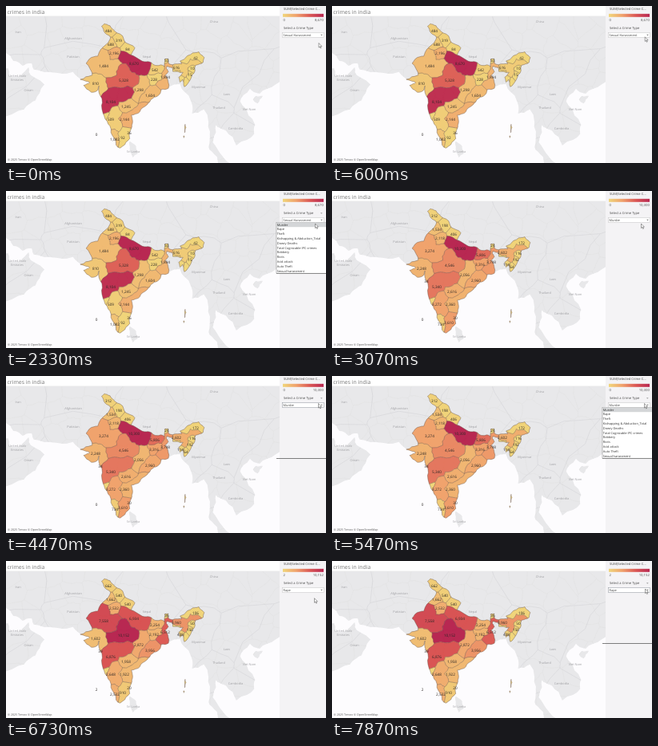
Animation of 400 by 197 pixels, one loop 8000 ms. Source, as an HTML page:

```html
<!DOCTYPE html>
<html lang="en">
<head>
<meta charset="utf-8">
<title>crimes in india</title>
<style>
html, body { margin: 0; width: 100%; height: 100%; overflow: hidden; background: #fff; }
svg { display: block; width: 400px; height: 197px; }
text { font-family: "Open Sans", "Noto Sans", sans-serif; text-rendering: geometricPrecision; }
</style>
</head>
<body>
<svg id="stage" viewBox="0 0 400 197"></svg>
<script>
const NS = 'http://www.w3.org/2000/svg';
const stage = document.getElementById('stage');
const LOOP = 8000;

function add(parent, tag, attrs, text) {
  const el = document.createElementNS(NS, tag);
  for (const k in attrs) el.setAttribute(k, attrs[k]);
  if (text !== undefined) el.textContent = text;
  parent.appendChild(el);
  return el;
}
const rect = (parent, x, y, width, height, fill, more) =>
  add(parent, 'rect', { x, y, width, height, fill, ...more });
const label = (parent, x, y, size, fill, text, more) =>
  add(parent, 'text', { x, y, 'font-size': size, fill, ...more }, text);
const show = (el, on) => el.setAttribute('visibility', on ? 'visible' : 'hidden');
const lerp = (a, b, k) => a.map((v, i) => v + (b[i] - v) * k);
const pairs = s => s.split(' ').map(p => p.split(',').map(Number));

// Mercator
function project([lon, lat]) {
  const m = Math.asinh(Math.tan(lat * Math.PI / 180)) * 180 / Math.PI;
  return [5.33 * lon - 270.7, 221.6 - 5.33 * m];
}

// Ragged line by midpoint displacement; the same edge bends alike from both ends
function bend(a, b, depth = 2) {
  if (!depth) return [b];
  const sx = a[0] + b[0], sy = a[1] + b[1];
  const d = 0.1 * Math.hypot(a[0] - b[0], a[1] - b[1]);
  const mid = [sx / 2 + d * Math.sin(sx * 1.7 + sy * 3.1), sy / 2 + d * Math.sin(sx * 2.9 + sy * 1.3)];
  return [...bend(a, mid, depth - 1), ...bend(mid, b, depth - 1)];
}
const line = pts => 'M' + pts.map(p => p[0].toFixed(2) + ' ' + p[1].toFixed(2)).join('L');
const ring = pts => line(pts.flatMap((p, i) => bend(p, pts[(i + 1) % pts.length]))) + 'Z';
const coast = s => ring(pairs(s).map(project));

// Part of a cell nearer to a than to b; each corner keeps the neighbour across its next edge
function trim(cell, a, b, neighbour) {
  const gap = p => (p[0] - b[0]) ** 2 + (p[1] - b[1]) ** 2 - (p[0] - a[0]) ** 2 - (p[1] - a[1]) ** 2;
  const out = [];
  cell.forEach((c, i) => {
    const q = cell[(i + 1) % cell.length].p, f = gap(c.p), g = gap(q);
    if (f >= 0) out.push(c);
    if (f >= 0 !== g >= 0) out.push({ p: lerp(c.p, q, f / (f - g)), next: f >= 0 ? neighbour : c.next });
  });
  return out;
}
// Nearest-seed regions: fill path per owner, and the lines between owners
function regions(seeds) {
  const fills = {};
  let lines = '';
  seeds.forEach((s, i) => {
    let cell = [[-60, -60], [460, -60], [460, 260], [-60, 260]].map(p => ({ p, next: -1 }));
    seeds.forEach((o, j) => { if (j !== i) cell = trim(cell, s.at, o.at, j); });
    fills[s.owner] = (fills[s.owner] || '') + ring(cell.map(c => c.p));
    cell.forEach((c, k) => {
      if (c.next > i && seeds[c.next].owner !== s.owner) {
        lines += line([c.p, ...bend(c.p, cell[(k + 1) % cell.length].p)]);
      }
    });
  });
  return { fills, lines };
}

const lands = [
  '48,40 48,30 50.5,29.5 52.5,27.5 54.7,26.5 56.8,27 57.3,25.7 61.5,25.1 66.5,25.2 68.2,23.7 73,24 79,22.5 89,21.9 91.6,22.6 94.3,18.5 94.4,16 97.2,17 98.6,12 98.3,8.3 100.3,6 101,2 103.5,2 103.4,4.5 101,6.9 99.3,9.4 100,13.4 101,12.7 102.5,12 104.8,8.7 109,11.4 109.2,13.5 107.2,16.9 105.7,18.8 108,21.6 110.3,20.5 114,22.5 118,24 118,40',
  '48,27.5 50.1,25.9 51.3,26 51.6,24.2 53.5,24.1 56.1,26.2 56.6,24.5 59.8,22.5 57.7,19 55,17 48,14',
  '79.8,9.7 81.3,8.5 81.7,6.8 80.5,5.9 79.8,8',
  '108.7,19.2 109.5,20 111,20 109.8,18.3'
].map(coast).join('');
const india = coast('73.2,34.5 73.9,35 75.2,34.6 76,33.8 76.8,33.2 77.7,32.9 78.8,31.3 81,30.2 80.1,28.8 82.5,27.6 84,27.4 85.8,26.6 88,26.4 88,27.9 88.8,28 88.9,27 89.9,26.7 92,26.9 91.6,27.5 94.6,29.2 96,29.4 97.3,28.2 97,27.2 95.2,26.6 94.6,24.7 94.2,23.9 93,22.2 92.6,22 92.2,23.6 91.6,23 91.3,24.1 92.3,25.1 89.9,25.3 89.8,26.1 88.5,26.4 88.4,25.9 88.9,25.3 88.1,24.5 88.8,23.2 88.9,21.7 87.2,21.4 86.4,20 84.7,19.1 83.3,17.6 82.2,16.5 80.2,15.7 80.3,13.4 79.8,11.8 79.8,10.3 78.9,9.4 77.5,8.1 76.6,8.8 75.4,11.7 74.5,14.3 73.3,17 72.8,20.2 72.6,22.2 72.2,21.2 70.8,20.8 69,22.3 70.4,22.9 68.2,23.6 71,24.5 70.2,26.4 69.6,27 70.4,28 72.3,28.5 74.4,31 75.3,32.3 74,33.2');
const islands = coast('92.8,13.6 93,12.9 92.7,11.7 92.7,13') + coast('92.4,10.9 92.6,10.9 92.5,10.5');

const countries = {
  Iran: '15,33', Afghanistan: '84,41', Pakistan: '84,64', China: '260,20', 'United Arab Emirates': '14,88',
  Oman: '28,106', Myanmar: '241,102', Thailand: '266,128', Laos: '276,111', 'Viet Nam': '304,130',
  Cambodia: '287,154', 'Sri Lanka': '159,183', Nepal: '176,64'
};

// Seeds of each state, the first also placing its number; then one value per crime type
const states = [
  ['128,31', '484 312 662'],
  ['141,43', '319 198 540'],
  ['131,48', '688 1,534 1,662'],
  ['135,59', '2,196 2,118 2,532'],
  ['152,54', '84 406 540'],
  ['160,72 148,64 171,78', '8,670 10,300 6,934'],
  ['122,75 122,62 108,72 137,74 130,82', '1,484 3,274 7,558'],
  ['112,97 119,97 118,104', '810 2,248 1,602'],
  ['147,93 146,81 133,95 159,95', '5,328 4,546 10,152'],
  ['131,120 124,114 123,127 134,111 147,112 154,109', '8,104 5,340 6,876'],
  ['123,139', '- - -'],
  ['131,142 137,135 139,149 133,149', '509 3,272 2,648'],
  ['136,167 132,159 139,174', '1,082 734 2,532'],
  ['146,165 150,157 145,174', '92 3,610 910'],
  ['148,142 152,148 157,139 165,132 173,126', '2,144 2,360 1,922'],
  ['150,126 157,123', '1,245 2,616 1,958'],
  ['166,105 164,114 172,96', '1,298 2,056 2,872'],
  ['180,112 172,117 184,107 188,106', '1,604 2,960 3,956'],
  ['185,92 191,89', '228 3,316 2,192'],
  ['186,80 193,79', '542 5,806 2,254'],
  ['199,89 194,97 200,83 203,75', '1,894 3,798 6,512'],
  ['201,68', '53 24 36'],
  ['213,77 222,76 231,73 237,71 223,84', '616 2,602 3,960'],
  ['212,83', '- - -'],
  ['237,65 224,68 243,64', '42 172 106'],
  ['233,78', '10 116 50'],
  ['230,86', '15 192 150'],
  ['225,95', '- 64 -'],
  ['218,92', '- 114 438']
].map(([seeds, values]) => ({ seeds: pairs(seeds), values: values.split(' ') }));
// Numbers of places too small for a shape
const spots = [['154,159', '36 30 20'], ['118,113', '- 34 39'], ['113,161', '0 0 2']]
  .map(([at, values]) => ({ seeds: pairs(at), values: values.split(' ') }));

const kinds = [
  { name: 'Sexual Harassment', low: '0', high: '8,670' },
  { name: 'Murder', low: '0', high: '10,300' },
  { name: 'Rape', low: '2', high: '10,152' }
];
const ramp = [[240, 214, 122], [240, 161, 108], [218, 86, 84], [184, 40, 82]];
function shade(f) {
  const n = ramp.length - 1, i = Math.min(n - 1, Math.floor(f * n));
  return 'rgb(' + lerp(ramp[i], ramp[i + 1], f * n - i).map(Math.round).join(',') + ')';
}
const number = s => Number(s.replace(',', '')) || 0;

const defs = add(stage, 'defs');
function clip(id, d) {
  add(add(defs, 'clipPath', { id }), 'path', { d });
  return { 'clip-path': `url(#${id})` };
}

// Base map: countries grow around their names, provinces around a jittered grid
const map = add(stage, 'g', { ...clip('frame', 'M0 13H342V197H0Z'), 'stroke-linejoin': 'round' });
rect(map, 0, 13, 342, 184, '#fdfcfe');
add(map, 'path', { d: lands, fill: '#e8e8ea' });
const soil = add(map, 'g', { ...clip('land', lands), fill: 'none', 'stroke-width': 0.5 });
let seed = 7;
const random = () => (seed = seed * 16807 % 2147483647) / 2147483647;
const grid = [];
for (let x = 0; x < 360; x += 24) {
  for (let y = 10; y < 210; y += 24) grid.push({ owner: grid.length, at: [x + random() * 20, y + random() * 20] });
}
add(soil, 'path', { d: regions(grid).lines, stroke: '#dededf' });
const nations = Object.entries(countries).map(([owner, at]) => ({ owner, at: pairs(at)[0] }));
add(soil, 'path', { d: regions(nations).lines, stroke: '#cfcfd2' });
for (const { owner, at } of nations) {
  const rows = owner.length > 12 ? ['United Arab', 'Emirates'] : [owner];
  rows.forEach((s, i) => label(map, at[0], at[1] + 1.3 + i * 4.4, 3.9, '#a0a0a4', s, { 'text-anchor': 'middle' }));
}

// States and their numbers
const cells = regions(states.flatMap((s, owner) => s.seeds.map(at => ({ owner, at }))));
const inside = add(map, 'g', clip('india', india));
const areas = states.map((s, i) => add(inside, 'path', { d: cells.fills[i], 'stroke-width': 0.3 }));
const ink = { fill: 'none', stroke: '#6b5648', 'stroke-width': 0.45 };
add(inside, 'path', { d: cells.lines, ...ink });
add(map, 'path', { d: india, ...ink });
add(map, 'path', { d: islands, ...ink, fill: shade(0) });
const marked = [...states, ...spots];
const marks = marked.map(({ seeds: [[x, y]] }) => label(map, x, y + 1.7, 4.7, '#2c2826', '', { 'text-anchor': 'middle' }));
label(map, 2, 193.6, 3.6, '#555', '© 2025 Tervox © OpenStreetMap');

// Title and side panel
rect(stage, 0, 0, 342, 13, '#fff');
rect(stage, 0, 12.6, 342, 0.4, '#e2e2e2');
label(stage, 1.6, 9.5, 6.9, '#777', 'crimes in india');
rect(stage, 342, 0, 58, 197, '#f4f3f5');
label(stage, 347, 5.4, 4.1, '#444', 'SUM(Selected Crime C...');
const grad = add(defs, 'linearGradient', { id: 'scale' });
ramp.forEach((c, i) => add(grad, 'stop', { offset: i / (ramp.length - 1), 'stop-color': `rgb(${c})` }));
rect(stage, 346, 9.8, 51, 4, 'url(#scale)');
const low = label(stage, 346.5, 18.6, 4.3, '#555', '');
const high = label(stage, 397, 18.6, 4.3, '#555', '', { 'text-anchor': 'end' });
label(stage, 347, 29.4, 4.1, '#444', 'Select a Crime Type');
const caret = add(stage, 'path', { d: 'M393 27.3h2.6l-1.3 1.5z', fill: '#999' });

// Drop-down box and its list
const ROW = 5.8;
const box = rect(stage, 345.5, 33.4, 52, 6, '#fff', { 'stroke-width': 0.5 });
const chosen = label(stage, 346.6, 0, 3.9, '#444', '');
add(stage, 'path', { d: 'M393.2 35.7h2.6l-1.3 1.6z', fill: '#777' });
const edge = rect(stage, 338, 103, 62, 0.7, '#4a4a4a');
const list = add(stage, 'g');
rect(list, 338, 39.4, 62.5, 11 * ROW, '#fff', { stroke: '#777', 'stroke-width': 0.5 });
const bar = rect(list, 338.3, 0, 62, ROW, '#d4d6d8');
['Murder', 'Rape', 'Theft', 'Kidnapping & Abduction_Total', 'Dowry Deaths', 'Total Cognizable IPC crimes', 'Robbery',
  'Riots', 'Acid attack', 'Auto Theft', 'Sexual harassment']
  .forEach((s, i) => label(list, 338.8, 43.6 + i * ROW, 3.9, '#333', s));

const cursor = add(stage, 'path', { d: 'M0 0V5.6L1.3 4.4L2.2 6.5L3 6.1L2.1 4.1H3.9Z', fill: '#fff', stroke: '#444', 'stroke-width': 0.5 });

// Pointer moves: from, until, where to
const moves = [[70, 870, [391.3, 36]], [1930, 2130, [386.5, 41]], [3800, 4400, [390.5, 34.5]],
  [5470, 5730, [385.5, 46.7]], [7530, 7730, [391.5, 35]]];
function pointer(t) {
  let at = [391, 46.5];
  for (const [from, until, to] of moves) {
    const u = Math.min(1, Math.max(0, (t - from) / (until - from)));
    at = lerp(at, to, u * u * (3 - 2 * u));
  }
  return at;
}
const during = (t, ...spans) => spans.some(([a, b]) => t >= a && t < b);

let current = -1;
function setKind(k) {
  if (k === current) return;
  current = k;
  const top = number(kinds[k].high);
  states.forEach((s, i) => {
    const c = shade(number(s.values[k]) / top);
    areas[i].setAttribute('fill', c);
    areas[i].setAttribute('stroke', c);
  });
  marked.forEach((s, i) => { marks[i].textContent = s.values[k].replace('-', ''); });
  low.textContent = kinds[k].low;
  high.textContent = kinds[k].high;
  chosen.textContent = kinds[k].name;
}

function draw(t) {
  setKind(t < 2870 ? 0 : t < 6600 ? 1 : 2);
  const pressed = during(t, [930, 1670], [4400, 4870], [7700, LOOP]);
  box.setAttribute('stroke', pressed ? '#8b9299' : '#c4c4c4');
  chosen.setAttribute('y', pressed ? 38.3 : 37.8);
  show(caret, during(t, [930, 2800], [4400, 6600], [7530, LOOP]));
  show(edge, during(t, [1670, 2730], [4470, 5870], [7800, LOOP]));
  show(list, during(t, [1670, 2730], [4870, 5870]));
  bar.setAttribute('y', 39.4 + ROW * (t < 2000 ? 10 : t < 5600 ? 0 : 1));
  show(cursor, !during(t, [3800, 4400]));
  cursor.setAttribute('transform', `translate(${pointer(t)})`);
}

const start = performance.now();
function tick() {
  draw((performance.now() - start) % LOOP);
  requestAnimationFrame(tick);
}
tick();
</script>
</body>
</html>
```
